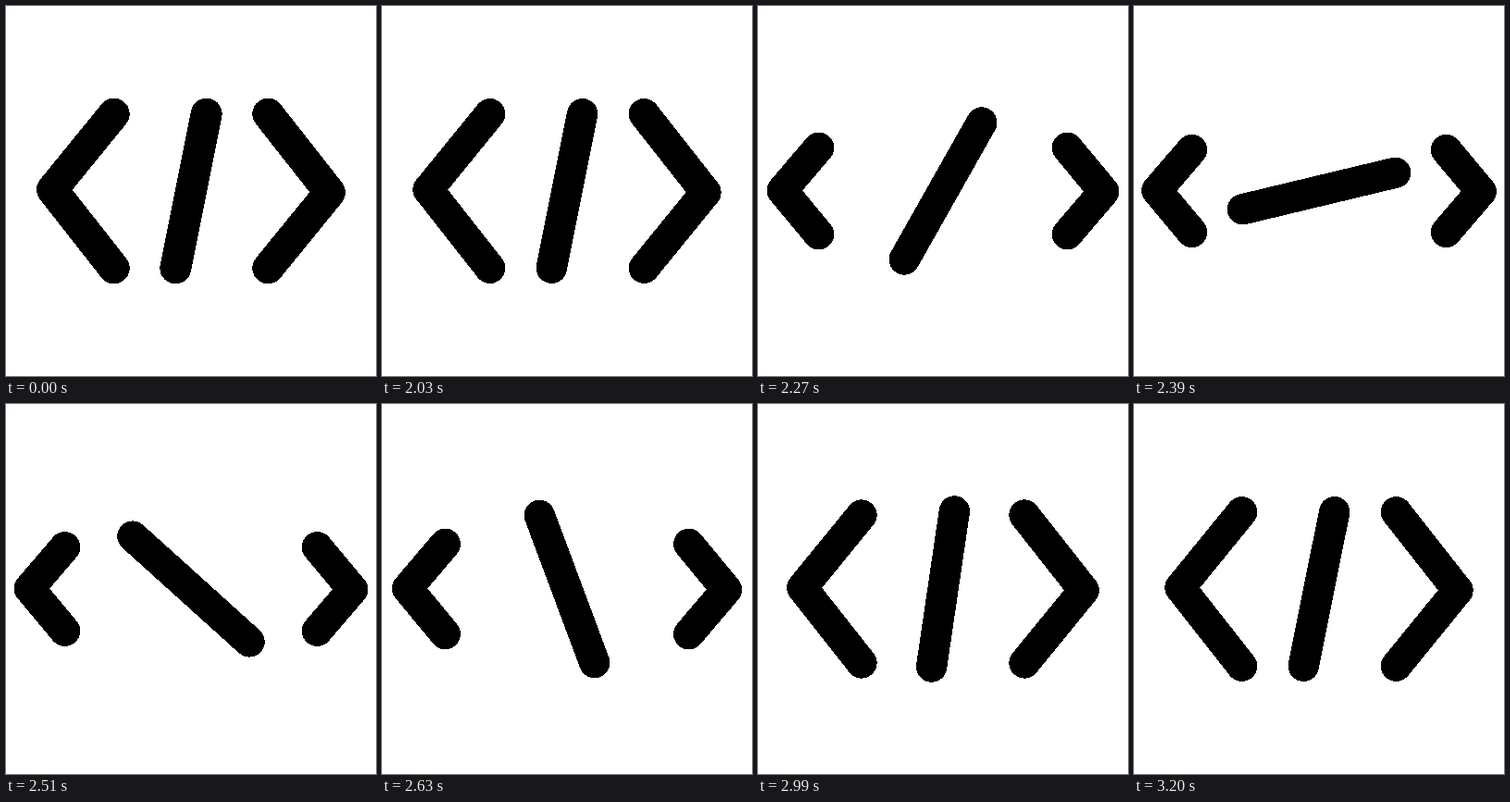
These frames come from a looping animation (400 px wide and 400 px high, 3.23 s). An HTML page:

```html
<!DOCTYPE html>
<html lang="en">
<head>
<meta charset="utf-8">
<title>Code icon</title>
<style>
  html, body { margin: 0; width: 100%; height: 100%; overflow: hidden; background: #fff; }
  svg { display: block; width: 100vw; height: 100vh; }
  path {
    fill: none; stroke: #000;
    stroke-linecap: round; stroke-linejoin: round; shape-rendering: crispEdges;
  }
</style>
</head>
<body>
<svg id="icon" viewBox="0 0 400 400">
  <path id="left"/>
  <path id="slash" d="M216.67 116.67 183.33 283.33"/>
  <path id="right" transform="rotate(180 200 200)"/>
</svg>
<script>
const LOOP = 3230, HOLD = 2030, STEP = 30, MOVE = 1200;
const PEAK = 0.3; // share of the move at which the brackets are fully apart
const REST_WIDTH = 34, MOVE_WIDTH = 33.33;

const [icon, left, slash, right] =
  ['icon', 'left', 'slash', 'right'].map(id => document.getElementById(id));

const lerp = (a, b, k) => a + (b - a) * k;

// cubic-bezier(x1, 0, x2, y2), solved by bisection
function ease(x1, x2, y2 = 1) {
  const curve = (a, b, s) =>
    3 * a * s * (1 - s) ** 2 + 3 * b * s * s * (1 - s) + s ** 3;
  return x => {
    if (x <= 0) return 0;
    if (x >= 1) return 1;
    let lo = 0, hi = 1;
    for (let i = 0; i < 30; i++) {
      const s = (lo + hi) / 2;
      if (curve(x1, x2, s) < x) lo = s;
      else hi = s;
    }
    return curve(0, y2, lo);
  };
}

const spin = ease(0.487, 0.083, 1.013);
const apart = ease(0.35, 0.07);
const back = ease(0.635, 0.316);

function draw(t) {
  const u = t < HOLD ? 0 : Math.floor((t - HOLD) / STEP) * STEP / MOVE;
  const k = u < PEAK ? apart(u / PEAK) : 1 - back((u - PEAK) / (1 - PEAK));

  const x = lerp(116.67, 62.5, k), dy = lerp(83.33, 44.5, k);
  const tipX = lerp(50, 24.8, k), tipY = lerp(198.5, 199.4, k);
  const d = `M${x} ${200 - dy} ${tipX} ${tipY} ${x} ${200 + dy}`;
  left.setAttribute('d', d);
  right.setAttribute('d', d);
  slash.setAttribute('transform', `rotate(${180 * spin(u)} 200 200)`);
  icon.setAttribute('stroke-width', t < HOLD ? REST_WIDTH : MOVE_WIDTH);
  for (const p of [left, slash, right]) {
    p.style.strokeWidth = t < HOLD ? REST_WIDTH : MOVE_WIDTH;
  }
}

const start = performance.now();
function tick() {
  draw((performance.now() - start) % LOOP);
  requestAnimationFrame(tick);
}
tick();
</script>
</body>
</html>
```
